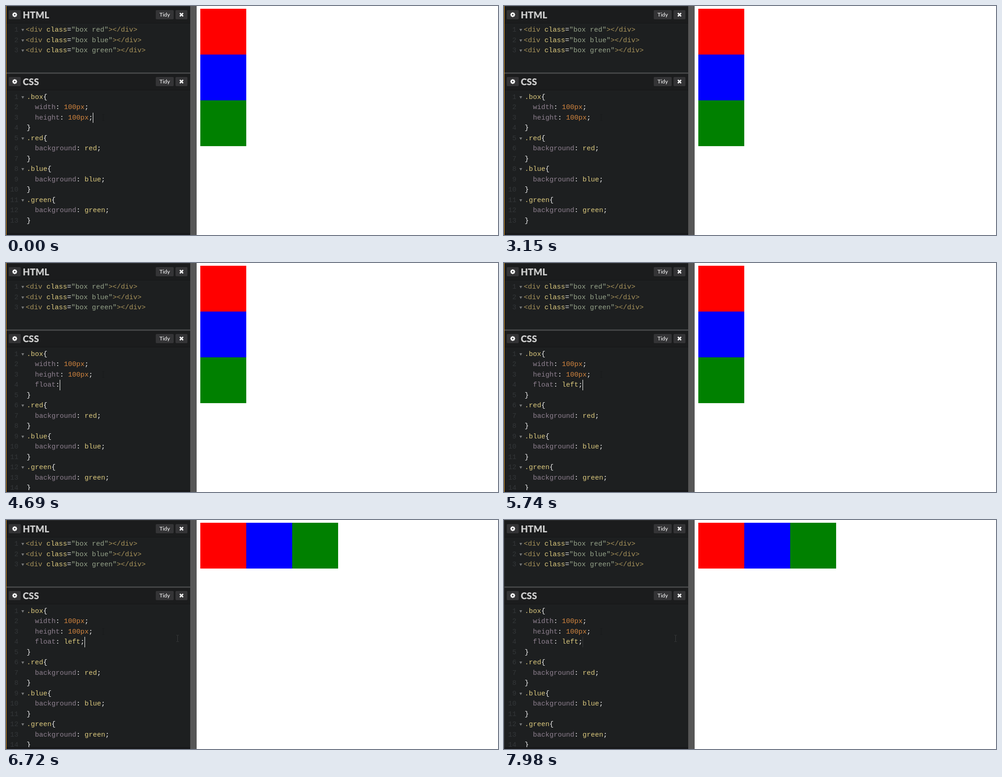
Recreate the animation shown at these times as an HTML page with a canvas. Size 1071 px wide and 500 px high, loop 8050 ms.

```html
<!DOCTYPE html>
<html lang="en">
<head>
<meta charset="utf-8">
<title>Floating boxes</title>
<style>
html, body { margin: 0; width: 100%; height: 100%; overflow: hidden; background: #fff; }
canvas { display: block; }
</style>
</head>
<body>
<canvas id="stage" width="1071" height="500"></canvas>
<script>
const ctx = document.getElementById('stage').getContext('2d', { alpha: false });
const LOOP = 8050, STEP = 70;
const NEWLINE = 3640, FLOATED = 6160, BLUR = 7980;
const ROW = 22.5, CHAR = 9, CODE_X = 45;
const MONO = '15px "Liberation Mono", monospace';
const COLOR = {
  tag: '#a7925a', name: '#ddca7e', string: '#96a38a', prop: '#8f8190',
  number: '#d2853f', mark: '#f4f4f4', gutter: '#333638', fold: '#77797a'
};

const BOXES = ['red', 'blue', 'green'];
const RULE_START = ['.box{', '  width: 100px;', '  height: 100px;'];
const RULE_END = ['}', ...BOXES.flatMap(c => [`.${c}{`, `  background: ${c};`, '}'])];
const TYPED = 'float: left;';
const KEY_TIMES = [3990, 4130, 4270, 4340, 4480, 4690, 5040, 5250, 5320, 5390, 5600, 5740];
const CARET_FLIPS = [350, 770, 1260, 1750, 2240, 2730, 3150, 3640, 6230, 6720, 7210, 7700];

// Pointer path: time, x, y
const PATH = [
  [6440, 211, 243], [6580, 270, 246], [6720, 373, 258], [6860, 630, 345],
  [7000, 880, 431], [7070, 973, 462], [7140, 1012, 480], [7210, 1029, 492], [7280, 1040, 506]
];

function rect(x, y, w, h, color) {
  ctx.fillStyle = color;
  ctx.fillRect(x, y, w, h);
}

function text(str, x, y, color, font = MONO, align = 'left') {
  ctx.font = font;
  ctx.textAlign = align;
  ctx.fillStyle = color;
  ctx.fillText(str, x, y);
}

function polygon(points, color) {
  ctx.beginPath();
  points.forEach(([x, y]) => ctx.lineTo(x, y));
  ctx.closePath();
  ctx.fillStyle = color;
  ctx.fill();
}

function tokens(parts, x, y) {
  for (const [str, color] of parts) {
    text(str, x, y, color);
    x += str.length * CHAR;
  }
}

function button(x, y, w) {
  ctx.beginPath();
  ctx.roundRect(x, y, w, 20, 2);
  ctx.fillStyle = '#343436';
  ctx.fill();
}

function gear(x, y) {
  ctx.save();
  ctx.translate(x, y);
  for (let i = 0; i < 4; i++) {
    rect(-1.3, -5.2, 2.6, 10.4, '#fff');
    ctx.rotate(Math.PI / 4);
  }
  ctx.beginPath();
  ctx.arc(0, 0, 2.9, 0, 7);
  ctx.lineWidth = 2.4;
  ctx.strokeStyle = '#fff';
  ctx.stroke();
  ctx.beginPath();
  ctx.arc(0, 0, 1.7, 0, 7);
  ctx.fillStyle = '#343436';
  ctx.fill();
  ctx.restore();
}

function cross(x, y) {
  ctx.beginPath();
  ctx.moveTo(x - 3.5, y - 3.5);
  ctx.lineTo(x + 3.5, y + 3.5);
  ctx.moveTo(x + 3.5, y - 3.5);
  ctx.lineTo(x - 3.5, y + 3.5);
  ctx.lineWidth = 2.8;
  ctx.strokeStyle = '#fff';
  ctx.stroke();
}

function header(title, y) {
  rect(1, y, 400, 37, '#1b1c1d');
  rect(1, y + 37, 400, 1, '#151617');
  button(6, y + 9, 26);
  gear(19, y + 19);
  text(title, 36.5, y + 27, '#cccccc', '900 20px Lato, sans-serif');
  button(326, y + 9, 39);
  text('Tidy', 345.5, y + 23, '#fff', '12px Lato, sans-serif', 'center');
  button(369, y + 9, 26);
  cross(382, y + 19);
}

function gutter(number, y, foldable) {
  text(number, 27, y, COLOR.gutter, MONO, 'right');
  if (foldable) polygon([[33.5, y - 6], [39.5, y - 6], [36.5, y - 0.5]], COLOR.fold);
}

function htmlLine(name, i) {
  const y = Math.ceil(56 + i * ROW);
  gutter(i + 1, y, true);
  tokens([
    ['<div ', COLOR.tag], ['class', COLOR.name], ['=', COLOR.mark],
    [`"box ${name}"`, COLOR.string], ['></div>', COLOR.tag]
  ], 43, y);
}

function cssLine(line, i) {
  const y = Math.floor(203 + i * ROW);
  gutter(i + 1, y, line.endsWith('{'));
  const [, indent, word, colon, value, end] = line.match(/^(\s*)([.\w]*)(:?)(\s*\w*)([;{}]?)$/);
  tokens([
    [indent, COLOR.mark],
    [word, word.startsWith('.') ? COLOR.name : COLOR.prop],
    [colon, COLOR.mark],
    [value, /\d/.test(value) ? COLOR.number : COLOR.name],
    [end, COLOR.mark]
  ], CODE_X, y);
}

function caret(t, row, column) {
  const shown = CARET_FLIPS.filter(flip => flip <= t).length % 2 === 0;
  const rowTop = r => Math.floor(188 + r * ROW);
  const x = CODE_X + column * CHAR, y = rowTop(row), height = rowTop(row + 1) - y;
  if (t >= BLUR) rect(x, y, 1, height, '#36383a');
  else if (shown) rect(x, y, 1, height, '#fff');
}

function beam(x, y, color) {
  rect(x, y - 6, 1, 13, color);
  rect(x - 2, y - 7, 2, 1, color);
  rect(x + 1, y - 7, 2, 1, color);
  rect(x - 2, y + 7, 2, 1, color);
  rect(x + 1, y + 7, 2, 1, color);
}

function arrow(x, y) {
  const shape = [[0, 0], [0, 16.5], [3.8, 13], [6.3, 19], [9, 17.8], [6.5, 12], [11, 11.6]];
  polygon(shape.map(([dx, dy]) => [x + dx + 0.5, y + dy + 0.5]), '#fff');
  ctx.lineWidth = 1;
  ctx.strokeStyle = '#222';
  ctx.stroke();
}

function pointer(t) {
  // The text cursor leaves a faint trace where it rested and where it left the editor.
  beam(211, 243, '#18191a');
  if (t >= 6720) beam(373, 258, '#3a3c3d');
  if (t < 6510 || t >= 7280) return;
  const now = Math.floor(t / STEP) * STEP;
  const next = PATH.findIndex(p => p[0] >= now);
  const [t0, x0, y0] = PATH[next - 1], [t1, x1, y1] = PATH[next];
  const k = (now - t0) / (t1 - t0);
  const x = Math.round(x0 + (x1 - x0) * k), y = Math.round(y0 + (y1 - y0) * k);
  if (x < 401) beam(x, y, '#3a3c3d');
  else arrow(x, y);
}

function draw(t) {
  rect(0, 0, 1071, 500, '#fff');
  rect(0, 0, 401, 500, '#1d1f20');
  rect(401, 0, 14, 500, '#565656');
  header('HTML', 0);
  rect(0, 0, 401, 1, '#303132');
  BOXES.forEach(htmlLine);
  header('CSS', 146);
  rect(1, 145, 400, 3, '#444546');

  const added = t >= NEWLINE;
  const typed = TYPED.slice(0, KEY_TIMES.filter(key => key <= t).length);
  const lines = [...RULE_START, ...(added ? ['  ' + typed] : []), ...RULE_END];
  ctx.save();
  ctx.beginPath();
  ctx.rect(0, 184, 401, 313);
  ctx.clip();
  lines.forEach(cssLine);
  ctx.restore();
  rect(1, 496, 400, 4, '#17181a');
  rect(0, 0, 1, 500, t < BLUR ? '#f5a623' : '#303132');

  BOXES.forEach((color, i) => {
    const shift = i * 100, floated = t >= FLOATED;
    rect(423 + (floated ? shift : 0), 6 + (floated ? 0 : shift), 100, 100, color);
  });

  if (added) caret(t, 3, 2 + typed.length);
  else caret(t, 2, RULE_START[2].length);
  pointer(t);
}

const start = performance.now();
function frame() {
  draw((performance.now() - start) % LOOP);
  requestAnimationFrame(frame);
}
frame();
</script>
</body>
</html>
```
